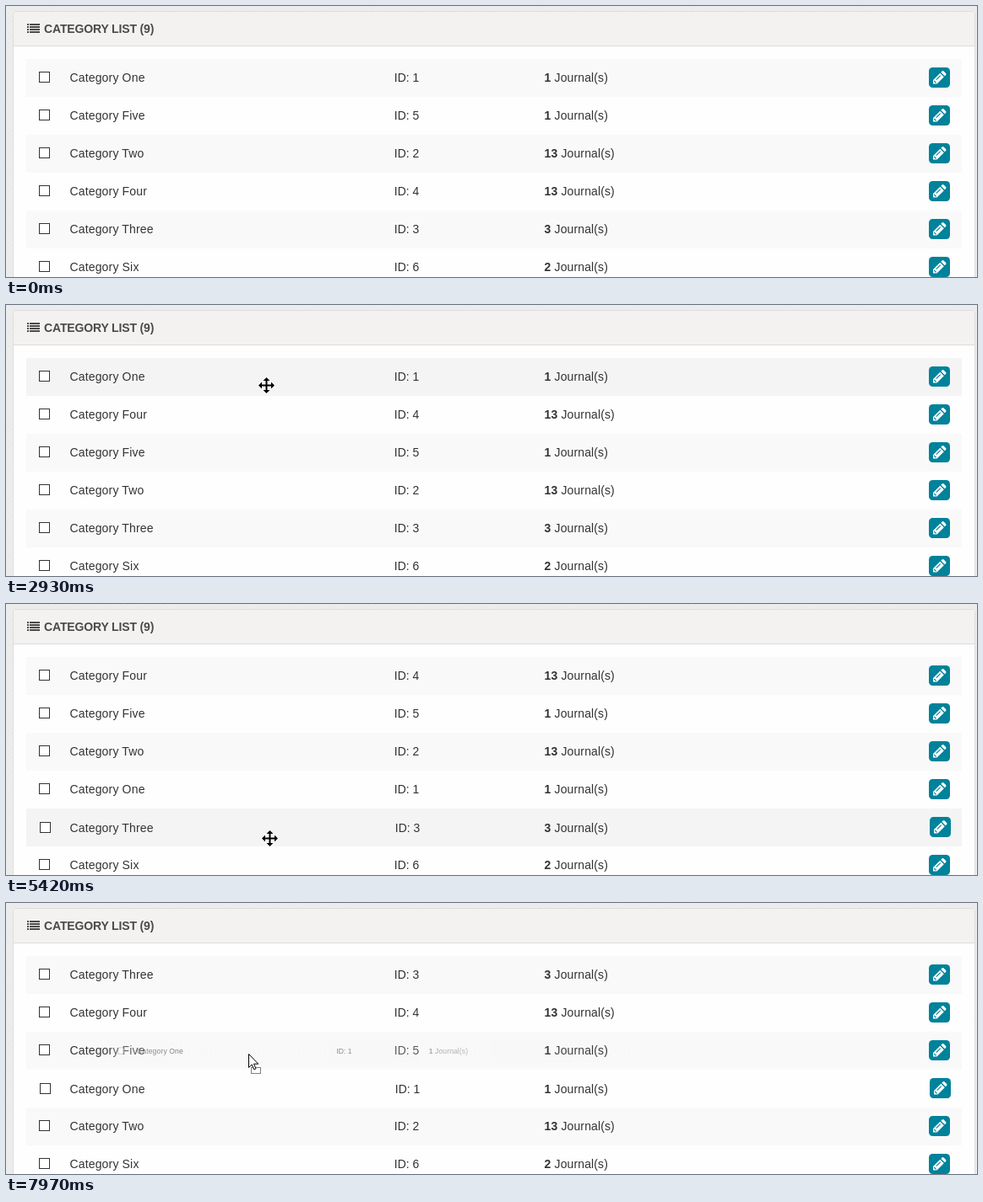
Write an HTML page that moves like this. It is 1150 px wide and 322 px high and loops after 8 s.

```html
<!DOCTYPE html>
<html lang="en">
<head>
<meta charset="utf-8">
<title>Category list</title>
<style>
html, body { margin: 0; width: 100%; height: 100%; overflow: hidden; }
body {
  position: relative;
  background: repeating-linear-gradient(45deg, #ededed 0 3px, #e9e9e9 3px 4px);
  font: 14px/45px "Liberation Sans", Arial, sans-serif;
  color: #333;
  cursor: default;
}
.panel {
  position: absolute; left: 8px; top: 6px; width: 1138px; height: 400px;
  border: 1px solid #ddd; border-radius: 4px; background: #fefefe; overflow: hidden;
}
.head { height: 40px; border-bottom: 1px solid #ddd; background: #f4f2f0; }
.head b {
  position: absolute; left: 36px; top: 0; line-height: 40px;
  letter-spacing: -.15px; color: #4d4a4a; white-space: nowrap;
}
.head svg { position: absolute; left: 16px; top: 14px; }
.row { position: absolute; left: 24px; top: 0; width: 1108px; height: 45px; white-space: nowrap; }
.row > * { position: absolute; top: 0; }
.box { left: 15px; top: 15px !important; width: 11px; height: 11px; border: 1px solid #333; background: #fff; }
.name { left: 51.4px; letter-spacing: .17px; }
.id { left: 435.8px; }
.count { left: 613.6px; letter-spacing: .12px; }
.edit { left: 1069px; top: 10px !important; }
.shift .box, .shift .id { transform: translate(1px, 1px); }
.shift .name, .shift .count { transform: translateY(1px); }
.shift .edit { transform: translateX(1px); }
#ghost { transform-origin: 0 0; background: rgba(248, 248, 248, .5); }
#ghost .edit { opacity: .15; }
#ghost .box { border-color: #777; }
.cursor { position: absolute; left: 0; top: 0; overflow: visible; }
</style>
</head>
<body>
<div class="panel">
  <div class="head">
    <svg width="15" height="12"><path d="M0 1h2m1 0h12M0 4h2m1 0h12M0 7h2m1 0h12M0 10h2m1 0h12" stroke="#4d4a4a" stroke-width="2"/></svg>
    <b>CATEGORY LIST (9)</b>
  </div>
</div>
<div id="list"></div>
<div id="ghost" class="row"></div>
<svg id="move" class="cursor" width="19" height="19">
  <path d="M9.5 0l4 4h-3v4.5H15v-3l4 4-4 4v-3h-4.5V15h3l-4 4-4-4h3v-4.5H4v3l-4-4 4-4v3h4.5V4h-3z" stroke="#fff" stroke-width="2" paint-order="stroke"/>
</svg>
<svg id="drag" class="cursor" width="16" height="25">
  <rect x="3.5" y="16.5" width="11" height="7" fill="#fff" stroke="#000" stroke-dasharray="1 1"/>
  <path d="M.5.5v16l3.7-3.5 2.6 5.8 2.2-1-2.5-5.6h5.3z" fill="#fff" stroke="#000"/>
</svg>
<script>
const LOOP = 8000, TOP = 63, ROW = 45, LEFT = 24, SCALE = .615;
const names = { 1: 'One', 2: 'Two', 3: 'Three', 4: 'Four', 5: 'Five', 6: 'Six' };
const counts = { 1: 1, 2: 13, 3: 3, 4: 13, 5: 1, 6: 2 };

// time, mode, x, y [, last time, steps, last x, last y [, grab point]]
const moves = [
  [0, 'move', 470, 345],
  [270, 'move', 455, 286, 360, 2, 437, 244],
  [510, 'move', 426, 241],
  [680, 'move', 405, 234, 830, 3, 356, 222],
  [980, 'move', 354, 221],
  [1440, 'drag', 344, 197, 2000, 8, 313, 129, [347, 211]],
  [2170, 'move', 313, 129],
  [2780, 'move', 312, 120, 2930, 3, 308, 95],
  [3480, 'press', 308, 97],
  [3558, 'drag', 308, 112, 3870, 5, 307, 167],
  [3950, 'drag', 308, 178, 4270, 5, 312, 224],
  [4350, 'drag', 312, 226],
  [4410, 'idle', 312, 226],
  [4880, 'idle', 312, 236, 5190, 5, 312, 278],
  [5420, 'press', 312, 278],
  [5500, 'drag', 311, 253, 5960, 7, 302, 107],
  [6030, 'drag', 301, 104, 6190, 3, 300, 100],
  [6260, 'move', 300, 100],
  [6890, 'move', 300, 110, 7500, 9, 290, 270],
  [7820, 'press', 290, 270],
  [7900, 'drag', 289, 225, 7970, 2, 287, 179]
];

const $ = id => document.getElementById(id);
const rowAt = y => Math.floor((y - TOP) / ROW);
const lerp = (a, b, p) => a + (b - a) * p;

// Expand the moves; a dragged row follows the pointer one step late.
function buildSteps() {
  const steps = [];
  let order = [1, 5, 2, 4, 3, 6], grab = null, item = 0;
  for (const [t, mode, x, y, t1 = t, n = 1, x1 = x, y1 = y, hold] of moves) {
    for (let k = 0; k < n; k++) {
      const p = n > 1 ? k / (n - 1) : 0;
      const prev = steps[steps.length - 1];
      const s = { t: lerp(t, t1, p), mode, x: Math.round(lerp(x, x1, p)), y: Math.round(lerp(y, y1, p)) };
      const fresh = mode === 'drag' && prev.mode === 'move';
      if (fresh || mode === 'press') {
        grab = hold || [s.x, s.y];
        item = order[rowAt(grab[1])];
      }
      if (mode === 'drag' && !fresh) {
        order = order.filter(id => id !== item);
        order.splice(rowAt(prev.y), 0, item);
      }
      s.hover = fresh ? rowAt(grab[1]) : mode === 'move' || mode === 'press' ? rowAt(s.y) : -1;
      s.shift = mode === 'press' || (mode === 'drag' && !fresh);
      steps.push(Object.assign(s, { order, grab, item }));
    }
  }
  return steps;
}

const rowHtml = id => `<i class="box"></i><span class="name">Category ${names[id]}</span>
  <span class="id">ID: ${id}</span><span class="count"><b>${counts[id]}</b> Journal(s)</span>
  <svg class="edit" width="25" height="24"><rect width="25" height="24" rx="4.5" fill="#00829a"/>
  <path d="M5 19.5V15l8.3-8.3 4.5 4.5-8.3 8.3zM14.3 5.7l1.3-1.3q1-.8 2 0l2.5 2.5q.8 1 0 2l-1.3 1.3z" fill="#fff"/>
  <path d="M6.2 16l2.4 2.4M8.7 14.6l5-5" stroke="#00829a" stroke-width="1.1"/></svg>`;

const rows = {};
for (const id in names) {
  const el = rows[id] = document.createElement('div');
  el.className = 'row';
  el.innerHTML = rowHtml(id);
  $('list').append(el);
}

const place = (el, x, y, extra = '') => { el.style.transform = `translate(${x}px, ${y}px) ${extra}`; };
const show = (el, on) => { el.style.display = on ? '' : 'none'; };

function draw(s) {
  s.order.forEach((id, i) => {
    const el = rows[id];
    place(el, 0, TOP + i * ROW);
    el.style.background = i === s.hover ? '#f4f4f4' : i % 2 ? 'none' : '#f9f9f9';
    el.classList.toggle('shift', s.shift && id === s.item);
  });
  const dragging = s.mode === 'drag', ghost = $('ghost');
  show(ghost, dragging);
  show($('drag'), dragging);
  show($('move'), !dragging);
  place($('move'), s.x - 9, s.y - 9);
  place($('drag'), s.x, s.y);
  if (!dragging) return;
  const gx = s.grab[0] - LEFT, gy = s.grab[1] - TOP - rowAt(s.grab[1]) * ROW;
  const mask = `radial-gradient(circle 780px at ${gx}px ${gy}px, rgba(0,0,0,.72), transparent)`;
  ghost.innerHTML = rowHtml(s.item);
  ghost.style.webkitMaskImage = ghost.style.maskImage = mask;
  place(ghost, s.x - gx * SCALE - LEFT, s.y - gy * SCALE, `scale(${SCALE})`);
}

const steps = buildSteps();
const start = performance.now();
let current = null;
function tick() {
  const t = (performance.now() - start) % LOOP;
  const s = steps.findLast(step => step.t <= t) || steps[0];
  if (s !== current) draw(current = s);
  requestAnimationFrame(tick);
}
tick();
</script>
</body>
</html>
```
